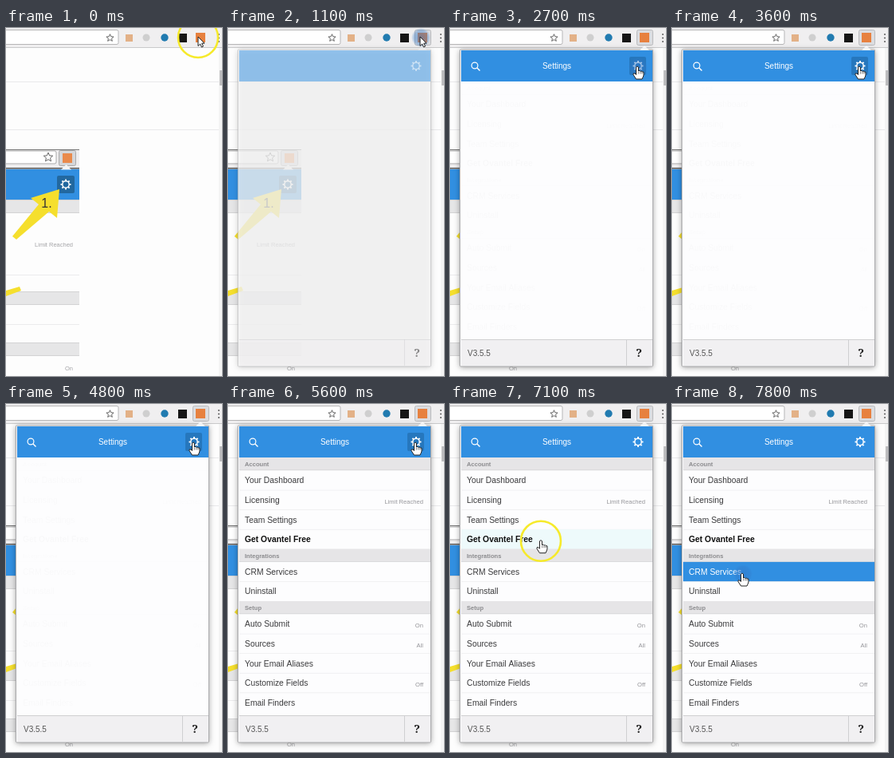
These frames come from a looping animation (271x436 px, 8000 ms). An HTML page with a canvas:

```html
<!DOCTYPE html>
<html lang="en">
<head>
<meta charset="utf-8">
<title>Extension settings walkthrough</title>
<style>
html, body { margin: 0; width: 100%; height: 100%; overflow: hidden; background: #fdfdfd; }
canvas { display: block; }
</style>
</head>
<body>
<canvas id="stage" width="271" height="436"></canvas>
<script>
const ctx = document.getElementById('stage').getContext('2d');
const LOOP = 8000, BLUE = '#318fe1', YELLOW = '#f5df2d';
const SANS = '"Liberation Sans", Arial, sans-serif';

const SECTIONS = [
  ['Account', 67, ['Your Dashboard', 'Licensing|Limit Reached', 'Team Settings', '*Get Ovantel Free']],
  ['Integrations', 181.5, ['CRM Services', 'Uninstall']],
  ['Setup', 247, ['Auto Submit|On', 'Sources|All', 'Your Email Aliases', 'Customize Fields|Off', 'Email Finders']]
];

// Pointer stops: time, x, y
const STOPS = [[0, 241, 11], [1900, 241, 11], [2400, 235, 48], [5750, 235, 48],
  [6300, 166, 88], [6500, 166, 88], [7480, 88, 212], [LOOP, 88, 212]];
const RING_TIMES = [[0, 800], [1900, 2400], [6130, 7550]];
const PRESS_TIMES = [[800, 1750], [2400, 3300], [7550, LOOP]];

const clamp = v => Math.max(0, Math.min(1, v));
const ramp = (t, from, to) => clamp((t - from) / (to - from));
const ease = p => p * p * (3 - 2 * p);
const during = (t, spans) => spans.some(([a, b]) => t >= a && t < b);

function rect(x, y, w, h, fill) {
  ctx.fillStyle = fill;
  ctx.fillRect(x, y, w, h);
}
function box(x, y, w, h, r, fill, stroke) {
  ctx.beginPath();
  ctx.roundRect(x, y, w, h, r);
  if (fill) { ctx.fillStyle = fill; ctx.fill(); }
  if (stroke) { ctx.strokeStyle = stroke; ctx.lineWidth = 1; ctx.stroke(); }
}
function disc(x, y, r, fill) {
  ctx.beginPath();
  ctx.arc(x, y, r, 0, 7);
  ctx.fillStyle = fill;
  ctx.fill();
}
function ring(x, y, r, color, width) {
  ctx.beginPath();
  ctx.arc(x, y, r, 0, 7);
  ctx.strokeStyle = color;
  ctx.lineWidth = width;
  ctx.stroke();
}
function poly(points, fill) {
  ctx.beginPath();
  points.forEach(p => ctx.lineTo(...p));
  ctx.closePath();
  ctx.fillStyle = fill;
  ctx.fill();
}
function line(x1, y1, x2, y2, color, width) {
  ctx.beginPath();
  ctx.moveTo(x1, y1);
  ctx.lineTo(x2, y2);
  ctx.strokeStyle = color;
  ctx.lineWidth = width;
  ctx.stroke();
}
function text(str, x, y, size, color, align = 'left', style = '', family = SANS) {
  ctx.font = `${style} ${size}px ${family}`;
  ctx.textAlign = align;
  ctx.textBaseline = 'alphabetic';
  ctx.fillStyle = color;
  ctx.fillText(str, x, y + size * 0.35);
}
function star(x, y, r) {
  ctx.beginPath();
  for (let i = 0; i < 10; i++) {
    const a = i * Math.PI / 5, d = i % 2 ? r * 0.45 : r;
    ctx.lineTo(x + Math.sin(a) * d, y - Math.cos(a) * d);
  }
  ctx.closePath();
  ctx.strokeStyle = '#666';
  ctx.lineWidth = 1;
  ctx.stroke();
}
function gear(x, y) {
  ring(x, y, 4.2, '#fff', 1.5);
  for (let i = 0; i < 8; i++) {
    const c = Math.cos(i * Math.PI / 4), s = Math.sin(i * Math.PI / 4);
    line(x + c * 4.4, y + s * 4.4, x + c * 6.5, y + s * 6.5, '#fff', 1.8);
  }
}

function drawPage() {
  rect(0, 0, 271, 436, '#fdfdfd');
  [67, 127].forEach(y => rect(0, y, 267, 1, '#e9e9eb'));

  // Screenshot embedded in the page
  rect(0, 152, 92, 25, '#efeeef');
  box(-5, 154, 68, 16, 2, '#fff', '#aaa');
  rect(0, 152, 92, 1, '#777');
  rect(0, 175, 92, 1.5, '#555');
  star(53, 162, 6);
  box(66.5, 153.5, 21, 19, 2, '#d5d6d9', '#aaa');
  rect(71, 157, 12, 12, '#e98a4c');
  rect(0, 177, 92, 38, BLUE);
  poly([[69, 177.5], [75.5, 171], [82, 177.5]], '#f5f5f5');
  box(64, 185, 22, 22, 2, '#22689f');
  gear(75, 196);
  [216, 331, 395].forEach(y => {
    rect(0, y - 1, 92, 17, '#d3d3d4');
    rect(0, y, 92, 15, '#e6e6e7');
  });
  [309, 371].forEach(y => rect(0, y, 92, 1, '#ececed'));
  text('Limit Reached', 84, 271, 7.5, '#a5a5a8', 'right');
  text('On', 84, 426, 7.5, '#a5a5a8', 'right');
  poly([[67, 202], [64, 238], [54, 230], [13, 265], [8, 261], [41, 221], [31, 213]], YELLOW);
  text('1.', 51, 219, 16, '#333', 'center');
  poly([[0, 329], [17, 324], [19, 329], [0, 336]], YELLOW);

  // Browser toolbar
  rect(0, 0, 271, 25, '#f0eff0');
  rect(0, 24, 271, 1, '#c9c9ca');
  box(-5, 2.5, 146, 18, 2, '#fff', '#b5b5b6');
  star(130.5, 12.5, 4.8);
  rect(150, 8, 9, 9, '#e3b187');
  disc(176, 12, 4.5, '#cfcfcf');
  disc(199, 12, 4.7, '#217bb0');
  rect(216, 7, 11, 11, '#161616');
  [8, 12.5, 17].forEach(y => disc(267, y, 1.1, '#666'));
  rect(267, 25, 4, 411, '#f4f4f4');
  rect(268, 53, 3, 19, '#bdbdbf');
}

function drawServices() {
  text('CRM Services', 133.5, 47, 9.9, '#fff', 'center');
  const body = '"Open Sans", sans-serif';
  text('To start saving time, connect to your', 133.5, 113, 10.45, '#444', 'center', '', body);
  text('CRM(s) or Cloud Services.', 133.5, 128.5, 10.45, '#444', 'center', '', body);
  disc(87.5, 171, 13.5, '#1b99d6');
  disc(89, 207, 14.5, '#80b9b5');
  text('plumvarde', 87.5, 240, 6.8, '#222', 'center', 'bold');
  disc(90, 276, 13, '#7a6050');
  rect(78.5, 299, 24, 24, '#20a565');
  for (let i = 0; i < 5; i++) box(183, 163 + i * 35.1, 14, 14, 2, '#e5e5e8');
}

function drawList(pointerY, hovering, pressed) {
  rect(14, 67, 240, 323, '#fdfdfe');
  SECTIONS.forEach(([title, top, rows]) => {
    rect(14, top, 240, 16, '#e6e5e7');
    rect(14, top + 15.5, 240, 0.7, '#d2d2d4');
    text(title, 21, top + 8.5, 7.6, '#8b8b8e', 'left', 'bold');
    rows.forEach((row, i) => {
      const y = top + 28.7 + i * 24.6;
      const hover = hovering && Math.abs(pointerY - y) < 12.3;
      const active = hover && pressed;
      if (hover) rect(14, y - 12.3, 240, 24.6, active ? BLUE : '#eefafb');
      if (i < rows.length - 1) rect(14, y + 12, 240, 0.7, '#ececee');
      const bold = row[0] === '*';
      const [label, value] = row.replace('*', '').split('|');
      text(label, 21, y, 10.35, active ? '#fff' : bold ? '#111' : '#3a3a3c', 'left', bold ? 'bold' : '');
      if (value) text(value, 245, y + 2, 7.6, '#96969a', 'right');
    });
  });
}

function drawPopup(t, pointer) {
  const settings = t >= 2500;
  ctx.save();
  ctx.globalAlpha = ramp(t, 1000, 1200);
  ctx.save();
  ctx.shadowColor = 'rgba(0,0,0,.4)';
  ctx.shadowBlur = 7;
  ctx.shadowOffsetY = 1;
  box(12.5, 27, 242, 397, 1, '#fdfdfe');
  ctx.restore();
  box(12.5, 27, 242, 397, 1, '#fdfdfe', '#a9a9ab');
  poly([[238, 28], [244, 22], [250, 28]], '#f4f4f5');
  rect(14, 28, 240, 39, BLUE);

  rect(14, 390, 240, 33, '#f1f0f2');
  rect(14, 390, 240, 1, '#cfcfd1');
  rect(221, 390, 1, 33, '#cfcfd1');
  text('?', 237, 407, 14, '#222', 'center', 'bold', '"Noto Serif", serif');

  if (settings) {
    text('Settings', 134, 47, 10, '#fff', 'center');
    ring(31, 47, 3.9, '#fff', 1.2);
    line(33.8, 49.8, 37.5, 53.5, '#fff', 1.4);
    text('V3.5.5', 22, 407, 10, '#555');
    ctx.save();
    ctx.globalAlpha = Math.max(0.02, ease(ramp(t, 4750, 5350)));
    drawList(pointer.y, t > 5750, t >= 7550);
    ctx.restore();
  } else {
    ctx.save();
    ctx.globalAlpha = ramp(t, 1150, 1450);
    drawServices();
    ctx.restore();
  }
  if (t > 2300 && t < 5900) box(225, 36, 21, 23, 2, '#2677bd');
  gear(236, 47.5);
  ctx.restore();
}

function pointerAt(t) {
  const i = STOPS.findIndex(s => s[0] > t);
  const [t0, x0, y0] = STOPS[i - 1], [t1, x1, y1] = STOPS[i];
  const p = ease(ramp(t, t0, t1));
  return { x: x0 + (x1 - x0) * p, y: y0 + (y1 - y0) * p };
}

function drawPointer(t, { x, y }) {
  if (during(t, PRESS_TIMES)) {
    const glow = ctx.createRadialGradient(x + 1, y + 1, 2, x + 1, y + 1, 12);
    glow.addColorStop(0, 'rgba(50,120,200,.55)');
    glow.addColorStop(0.7, 'rgba(50,120,200,.35)');
    glow.addColorStop(1, 'rgba(50,120,200,0)');
    disc(x + 1, y + 1, 12, glow);
  }
  if (during(t, RING_TIMES)) ring(x, y + 1, 25, '#f6ea2b', 2.6);

  const hand = new Path2D('M-1.5 1Q0-1 1.5 1V6L3 5.5 4 6.5 5.5 6 6.5 7 8 7.2V11Q7.5 13 6 16H-1.5L-5 10.5Q-5.5 8-3 9L-1.5 10.5Z');
  const arrow = new Path2D('M0 0V11.5L2.7 9 4.5 13 6.5 12 4.7 8.2H8Z');
  const shape = t < 2250 ? arrow : hand;
  ctx.save();
  ctx.translate(x, y);
  ctx.lineJoin = 'round';
  ctx.fillStyle = '#fff';
  ctx.strokeStyle = '#222';
  ctx.lineWidth = 1;
  ctx.fill(shape);
  ctx.stroke(shape);
  if (shape === hand) {
    for (const k of [1.7, 4, 6]) line(k, 7, k, 9.5, '#444', 0.7);
  }
  ctx.restore();
}

function frame() {
  const t = performance.now() % LOOP;
  const pointer = pointerAt(t);
  drawPage();
  if (t >= 800) box(234.5, 2.5, 20, 19, 2, '#dcdde0', '#b9babd');
  rect(238, 6, 12, 12, '#e7813f');
  if (t >= 1000) drawPopup(t, pointer);
  drawPointer(t, pointer);
  requestAnimationFrame(frame);
}
frame();
</script>
</body>
</html>
```
